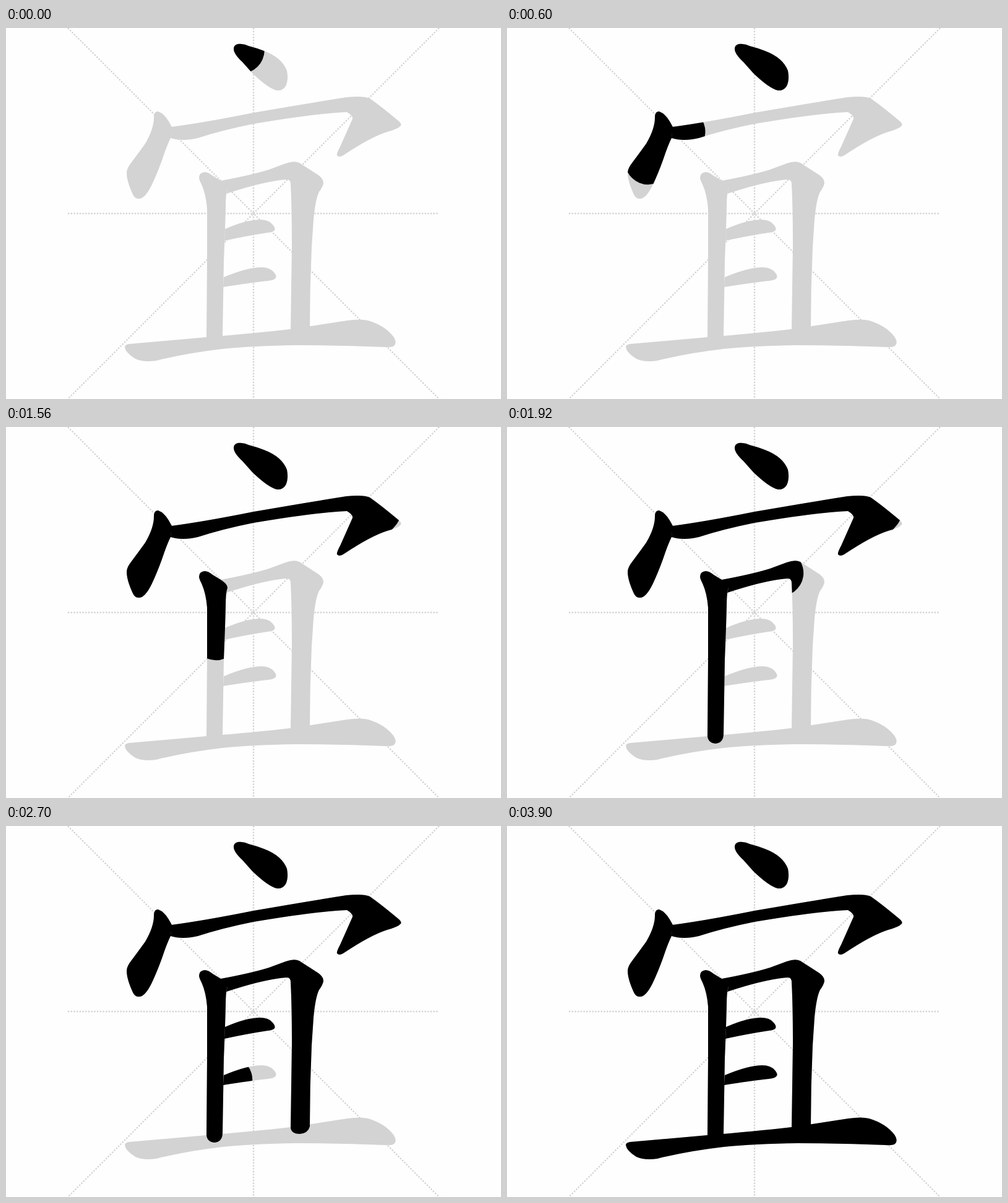
An HTML page that plays this animation: 800 px wide and 600 px high, repeating every 3.96 s.

```html
<!DOCTYPE html>
<html lang="zh">
<head>
<meta charset="utf-8">
<title>Stroke order</title>
<style>
  html, body { margin: 0; width: 100%; height: 100%; overflow: hidden; background: #fefefe; }
  svg { display: block; width: 800px; height: 600px; }
  .grid { stroke: #d3d3d3; stroke-width: 1; stroke-dasharray: 1 1; }
  .shape { fill: #d3d3d3; }
  .brush { fill: none; stroke: #000; stroke-width: 75; stroke-linecap: round; stroke-linejoin: round; stroke-dasharray: 1.1 3; }
</style>
</head>
<body>
<svg viewBox="0 0 800 600">
  <g class="grid" transform="translate(100) scale(2.34375)">
    <path d="M0 0L256 256"/>
    <path d="M256 0L0 256"/>
    <path d="M128 0V256"/>
    <path d="M0 128H256"/>
  </g>
  <g id="shapes"></g>
  <g id="ink"></g>
</svg>
<script>
const STEP = 60, STEPS = 66;

// start, length and full are counted in steps of the loop
const strokes = [
  { start: 0, length: 5, line: 'M380 36L418 62L438 86',
    shape: 'M368 34C368 27 374 25 381 26Q386 26 392 29Q404 32 417 37Q446 48 454 69Q457 84 452 94Q447 102 438 101Q424 98 398 73L382 55Q368 42 368 34Z' },
  { start: 5, length: 8.4, line: 'M246 148V172L228 216L214 262',
    shape: 'M239 145C239 137 242 135 246 135Q255 138 263 151L268 160L266 178Q260 190 252 214Q244 236 236 253Q225 276 215 276Q208 277 204 267Q195 247 195 234Q195 227 203 217Q212 205 225 187Q239 163 239 145Z' },
  { start: 9.67, length: 16.3, full: 37, line: 'M275 169L400 146L552 124L601 135L556 187',
    shape: 'M267 160Q320 153 400 137Q480 123 550 112Q578 109 588 114Q604 125 634 150Q640 155 638 158Q634 163 616 168Q590 176 545 206Q538 210 535 206Q534 203 540 192L560 147Q561 142 551 136Q500 138 400 155Q350 165 310 178Q285 184 266 178Z' },
  { start: 21.8, length: 11.2, line: 'M326 247L340 275L338 500',
    shape: 'M312 242Q312 234 321 233Q327 233 334 239L347 247Q358 254 358 260Q355 268 355 290Q354 330 352 376Q351 440 350 498Q349 511 337 512Q325 511 324 500L325 376V292Q323 266 314 249Q312 245 312 242Z' },
  { start: 28.37, length: 15.2, line: 'M356 258L462 231L486 250L478 320L475 480',
    shape: 'M347 247Q396 238 425 229L452 219Q466 214 474 218L505 238Q513 244 513 251Q512 257 506 265Q500 277 497 310L494 355Q491 420 491 486Q488 497 475 498Q461 498 460 488L462 353Q462 290 460 253Q460 245 454 245Q420 247 356 268L358 260Z' },
  { start: 40.5, length: 4.5, line: 'M358 335L400 322H420',
    shape: 'M354 325Q388 310 411 310Q424 310 430 317Q436 323 434 327Q432 330 423 331Q390 336 353 344Z' },
  { start: 44.8, length: 4.6, line: 'M358 411L400 399H422',
    shape: 'M352 403Q390 387 413 387Q426 387 433 395Q438 401 436 404Q434 408 423 409Q395 412 351 419Z' },
  { start: 48.4, length: 15.1, full: 64, line: 'M205 520H240L400 503L575 492L602 502',
    shape: 'M192 516Q192 512 199 511L324 500Q400 494 460 487Q500 481 552 473Q573 470 585 473Q612 481 626 499Q632 508 628 513Q625 517 612 516Q540 513 470 513Q400 514 350 519Q290 526 243 538Q222 541 209 535Q193 525 192 516Z' }
];

function add(parent, name, attrs) {
  const el = document.createElementNS('http://www.w3.org/2000/svg', name);
  for (const key in attrs) el.setAttribute(key, attrs[key]);
  return parent.appendChild(el);
}

const shapes = document.getElementById('shapes');
const ink = document.getElementById('ink');

strokes.forEach((s, i) => {
  add(shapes, 'path', { class: 'shape', d: s.shape });
  add(add(ink, 'clipPath', { id: 'clip' + i }), 'path', { d: s.shape });
  const group = add(ink, 'g', { 'clip-path': `url(#clip${i})` });
  s.brush = add(group, 'path', { class: 'brush', d: s.line, pathLength: 1 });
  s.full ??= s.start + s.length + 1;
});

function draw(step) {
  for (const s of strokes) {
    const done = Math.min(1, Math.max(0.002, (step - s.start) / s.length));
    s.brush.style.display = step < s.start ? 'none' : '';
    s.brush.style.strokeDashoffset = 1.1 - done;
    // a wide brush fills the corners the round tip could not reach
    s.brush.style.strokeWidth = step >= s.full ? 600 : 75;
  }
}

const begin = performance.now();
function tick() {
  draw(Math.floor((performance.now() - begin) / STEP) % STEPS);
  requestAnimationFrame(tick);
}
draw(0);
requestAnimationFrame(tick);
</script>
</body>
</html>
```
